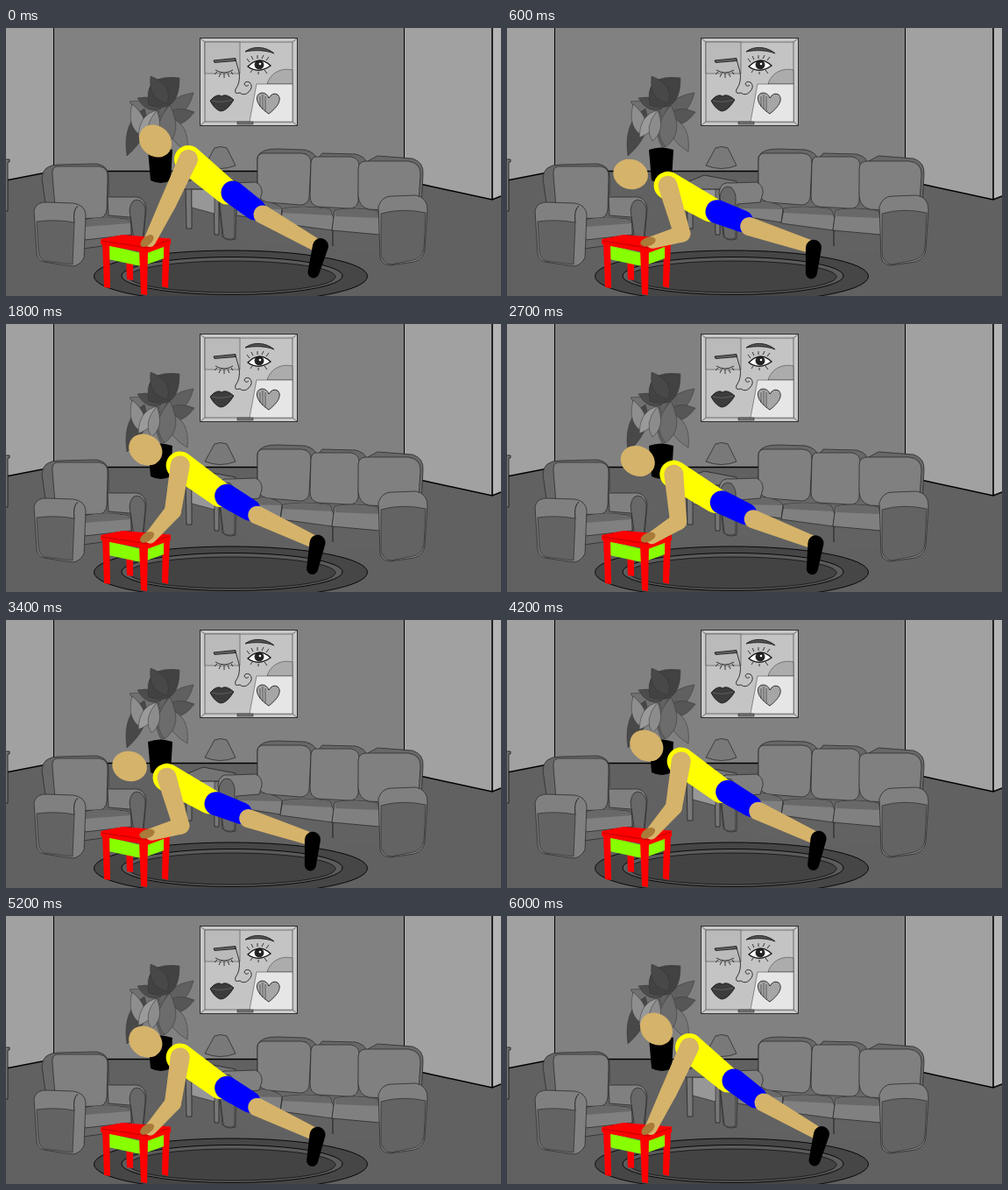
An HTML page that plays this animation: 565 px wide and 306 px high, repeating every 6100 ms.

```html
<!DOCTYPE html>
<html lang="en">
<head>
<meta charset="utf-8">
<title>Incline push-ups</title>
<style>
html, body { margin: 0; width: 100%; height: 100%; overflow: hidden; background: #616161; }
svg { display: block; width: 565px; height: 306px; }
.line { fill: none; stroke: #000; }
.soft { fill: #808080; stroke: #2c2c2c; stroke-width: .8; }
.back { fill: #686868; stroke: #2c2c2c; stroke-width: .8; }
.front { fill: #636363; stroke: #2c2c2c; stroke-width: .7; }
.shade { fill: #686868; }
</style>
</head>
<body>
<svg viewBox="0 0 565 306">
  <!-- room -->
  <path fill="#818181" d="M54 0H455V175H400L290 164H54Z"/>
  <path fill="#a1a1a1" d="M0 0H54V164L0 174ZM454 0H555V196L454 174Z"/>
  <path fill="#b4b4b4" d="M555 0H565V192L555 196Z"/>
  <path class="line" d="M54.5 0V164M454.5 0V174"/>
  <path class="line" stroke-width="1.6" d="M0 174L54 163.5H290M454 174L555 196L565 192M555 0V196"/>
  <path fill="#777" stroke="#000" stroke-width=".7" d="M0 150H4V153H2V209H0"/>

  <!-- painting -->
  <g stroke="#111" stroke-width=".8">
    <path fill="#c9c9c9" d="M221.500 11.500H332.500V111.500H221.500Z"/>
    <path fill="#c4c4c4" stroke-width=".5" d="M227 16H327V107H227ZM221.500 11.500L227 16M332.500 11.500L327 16M221.500 111.500L227 107M332.500 111.500L327 107"/>
    <path fill="#bababa" stroke-width=".4" d="M227 16H267V52H227Z"/>
    <path fill="#acacac" stroke-width=".4" d="M298 64C302 51 314 45 327 48V64Z"/>
    <path fill="#e6e6e6" stroke-width=".4" d="M286 64H327V107H278Z"/>
    <path fill="#777" stroke-width=".5" d="M264 107H282V110H264Z"/>
    <path fill="#666" d="M237 37L262 34.500V37.500L238 39.500Z"/>
    <path fill="none" d="M239 48Q249 54 259 48M241 50L238 53M245 52L243 56M249 52V57M253 52L255 56M257 50L259 53"/>
    <path fill="#555" d="M273 27C282 20 297 21 306 29C296 25 284 25 273 27Z"/>
    <path fill="#fff" stroke-width="1.200" d="M276 44Q289 31 302 43Q288 53 276 44Z"/>
    <circle cx="289" cy="42" r="5" fill="#222"/>
    <circle cx="290" cy="41" r="1.300" fill="#fff" stroke="none"/>
    <path fill="none" d="M278 39L275 35M282 36L280 32M287 35V31M292 35L294 31M297 37L300 33M281 48L279 51M288 50V53M295 48L298 52"/>
    <path fill="none" d="M262 36L266 50Q268 62 262 70Q260 76 267 74Q272 78 277 73Q283 67 278 62Q273 60 272 64Q274 68 277 65"/>
    <path fill="#3c3c3c" d="M233 83Q241 74 246 78Q251 74 260 82Q252 95 245 95Q238 93 233 83Z"/>
    <path fill="none" stroke="#777" stroke-width=".6" d="M235 83Q246 86 258 82"/>
    <path fill="#a6a6a6" d="M300 98C283 87 284 75 292 74Q298 74 300 80Q304 73 310 76C316 82 309 91 300 98Z"/>
    <path fill="none" stroke-width=".5" d="M290 78V90M293 76V93M296 78V95"/>
  </g>

  <!-- plant -->
  <g id="plant" stroke="#333" stroke-width=".5"></g>
  <path d="M162 139Q176 134 190 139L188 174Q177 180 165 174Z"/>

  <!-- lamp and side table -->
  <path fill="#797979" stroke="#2c2c2c" stroke-width=".8" d="M238 137Q245 134 252 137L262 157Q245 164 227 157Z"/>
  <path fill="#777" stroke="#222" stroke-width=".8" d="M205 182H212V229H206ZM237 184H243V236H238Z"/>
  <path fill="#979797" stroke="#222" stroke-width=".6" d="M212 184H238V212L212 205Z"/>
  <path fill="#747474" stroke="#222" stroke-width=".8" d="M203 177L225 168L262 175V184H203Z"/>

  <!-- armchair -->
  <path class="back" d="M45 200L41 172Q41 156 61 156L103 155Q118 157 117 172V190L100 215Z"/>
  <path class="back" d="M82 238L146 236V244L88 252Z"/>
  <path class="soft" d="M58 158H107Q117 160 116 171L115 207Q114 217 105 217L68 218Q58 216 56 205L53 168Q52 159 58 158Z"/>
  <path class="soft" d="M87 219Q112 215 137 218Q144 220 143 229V236L90 242Z"/>
  <path class="shade" d="M90 219Q115 213 141 220V223L90 227Z"/>
  <path class="soft" d="M116 193H149Q158 194 160 205L157 240Q152 246 144 241L142 216L117 214Z"/>
  <path class="back" d="M141 208Q143 193 153 197Q160 202 159 211L156 241L146 242Z"/>
  <path class="soft" d="M32 208Q35 198 47 199L77 200Q90 202 91 213L89 262Q85 271 76 272L43 267Q36 265 35 257Z"/>
  <path class="front" d="M35 221Q57 218 78 222L76 270L44 266Q38 264 37 255Z"/>
  <path class="line" stroke-width=".7" d="M78 222Q76 208 82 203"/>

  <!-- sofa -->
  <path class="back" d="M287 176V147Q291 138 309 138L341 139Q353 142 355 150L361 143L399 144Q410 147 411 153L424 146L464 149Q477 153 476 167L474 205L430 237H372L262 216Z"/>
  <path fill="#626262" d="M262 212L316 222L373 232L428 233V257L373 254L262 241Z"/>
  <path class="soft" d="M293 143H337Q349 144 348 155L346 194Q344 202 336 202L298 199Q288 196 287 187V150Q287 144 293 143Z"/>
  <path class="soft" d="M354 147H394Q405 149 403 162L402 198Q400 207 390 206L356 204Q347 202 347 192L348 154Q349 147 354 147Z"/>
  <path class="soft" d="M410 152H459Q474 154 473 168L471 198Q470 209 459 209L414 207Q403 204 402 192V161Q402 153 410 152Z"/>
  <path class="soft" d="M263 199L293 198Q312 200 315 207L313 222L263 214Z"/>
  <path class="soft" d="M316 206Q340 202 370 207L374 217L372 231L313 223Z"/>
  <path class="soft" d="M375 208Q399 204 424 209L427 219V236L372 231Z"/>
  <path class="shade" d="M317 206Q340 202 369 207L372 214L316 211ZM376 208Q399 204 423 209L426 217L376 215ZM264 199L293 198Q310 200 314 207L264 206Z"/>
  <path class="line" stroke-width=".7" d="M373 231V249"/>
  <path class="soft" d="M242 187Q244 175 255 177L285 176Q293 180 292 189L289 199L263 201L262 241Q252 244 247 238Z"/>
  <path class="back" d="M243 192Q246 178 256 182Q262 188 261 198V240Q253 243 248 238Z"/>
  <path class="soft" d="M425 204Q429 192 440 192L468 191Q481 194 481 207L478 253Q477 263 466 267L438 271Q428 270 427 261Z"/>
  <path class="front" d="M428 212Q452 205 479 211L477 252Q475 262 465 265L439 270Q429 268 428 258Z"/>

  <!-- rug -->
  <g stroke="#080808">
    <ellipse cx="256.500" cy="283.500" rx="156" ry="29.500" fill="#464646"/>
    <ellipse cx="258" cy="283" rx="126" ry="21.500" fill="#5b5b5b"/>
    <ellipse cx="258" cy="284" rx="118" ry="18" fill="#434343" stroke-width=".7"/>
  </g>

  <!-- stool -->
  <path fill="#f00" d="M137 260H145V288L138 287ZM179 246H187L185 297L178 295Z"/>
  <path fill="#8f0" d="M117 248L154 257V272L117 264ZM161 256L180 248V263L161 270Z"/>
  <path fill="#f00" d="M110 246H118L119 297L112 296ZM152 253H162L161 305L154 304Z"/>
  <path fill="#f00" d="M108 241L133 236L188 240.500V247L161 257L108 247Z"/>
  <path fill="none" stroke="#700" stroke-width=".5" d="M109 243L161 251L187 242"/>

  <g id="man"></g>
</svg>
<script>
const NS = 'http://www.w3.org/2000/svg';
const plant = document.getElementById('plant');
const man = document.getElementById('man');

function add(parent, tag, fill) {
  const el = document.createElementNS(NS, tag);
  el.setAttribute('fill', fill);
  return parent.appendChild(el);
}

// Leaf from its stem point to its tip, bulging by w on both sides.
function leaf(x, y, tx, ty, w, fill) {
  const dx = tx - x, dy = ty - y, n = Math.hypot(dx, dy);
  const side = s => `${x + dx * .4 - s * dy / n * w} ${y + dy * .4 + s * dx / n * w}`;
  add(plant, 'path', fill).setAttribute('d',
    `M${x} ${y}Q${side(1)} ${tx} ${ty}Q${side(-1)} ${x} ${y}Z`);
}
[
  [178, 138, 184, 74, 19, '#626262'],
  [176, 100, 141, 84, 15, '#707070'],
  [177, 92, 150, 80, 13, '#4c4c4c'],
  [180, 104, 214, 74, 18, '#606060'],
  [180, 106, 215, 96, 17, '#565656'],
  [163, 88, 198, 57, 32, '#424242'],
  [184, 86, 165, 55, 17, '#484848'],
  [158, 92, 138, 146, 19, '#484848'],
  [156, 124, 144, 87, 15, '#8e8e8e'],
  [187, 102, 207, 141, 17, '#767676'],
  [181, 136, 187, 88, 20, '#6c6c6c'],
  [173, 94, 151, 125, 15, '#9a9a9a'],
  [166, 129, 172, 94, 13, '#8c8c8c']
].forEach(l => leaf(...l));

const mix = (a, b, p) => a + (b - a) * p;

// Outline of two circles joined by their common tangents.
function limb([x1, y1], r1, [x2, y2], r2) {
  const dir = Math.atan2(y2 - y1, x2 - x1);
  const off = Math.acos((r1 - r2) / Math.hypot(x2 - x1, y2 - y1));
  const pt = (x, y, r, a) => `${x + r * Math.cos(a)} ${y + r * Math.sin(a)}`;
  return `M${pt(x1, y1, r1, dir + off)}A${r1} ${r1} 0 1 1 ${pt(x1, y1, r1, dir - off)}` +
    `L${pt(x2, y2, r2, dir - off)}A${r2} ${r2} 0 0 1 ${pt(x2, y2, r2, dir + off)}Z`;
}

// Each joint: x, y with arms straight, then x, y at the lowest point.
const joints = {
  head: [170.500, 129, 138, 171],
  shoulder: [208, 150, 181, 183],
  waist: [252, 187, 230, 209],
  hip: [259, 188, 238, 212],
  thigh: [284, 207, 267, 222],
  knee: [293, 213, 275, 228],
  ankle: [351, 246, 343, 249],
  heel: [359, 249, 349, 251],
  toe: [351, 279, 347, 280],
  elbow: [184.500, 201, 201.500, 238.500],
  wrist: [164, 243, 166, 245]
};
const skin = '#d5b36a';
const limbs = [
  ['shoulder', 16, 'waist', 14.500, '#ff0'],
  ['hip', 13.500, 'thigh', 12.500, '#00f'],
  ['knee', 10.500, 'ankle', 7.500, skin],
  ['heel', 9, 'toe', 6.500, '#000'],
  ['shoulder', 11, 'elbow', 9.500, skin],
  ['elbow', 9.500, 'wrist', 7, skin]
].map(([a, ra, b, rb, fill]) => ({ a, ra, b, rb, el: add(man, 'path', fill) }));

function oval(rx, ry, fill) {
  const el = add(man, 'ellipse', fill);
  el.setAttribute('rx', rx);
  el.setAttribute('ry', ry);
  return (x, y, turn) => el.setAttribute('transform', `translate(${x} ${y}) rotate(${turn})`);
}
const hand = oval(9, 5, '#a97a38');
const head = oval(20, 17, skin);

function pose(p) {
  const at = {};
  for (const [name, [x, y, x2, y2]] of Object.entries(joints))
    at[name] = [mix(x, x2, p), mix(y, y2, p)];
  for (const { a, ra, b, rb, el } of limbs) el.setAttribute('d', limb(at[a], ra, at[b], rb));
  hand(161, mix(243, 244, p), mix(-40, -15, p));
  head(...at.head, mix(45, 12, p));
}

// Six push-ups of one second in 100 ms steps, plus one step of rest.
const start = performance.now();
function tick() {
  const step = Math.floor((performance.now() - start) % 6100 / 100);
  pose((1 - Math.cos(step * Math.PI / 5)) / 2);
  requestAnimationFrame(tick);
}
tick();
</script>
</body>
</html>
```
